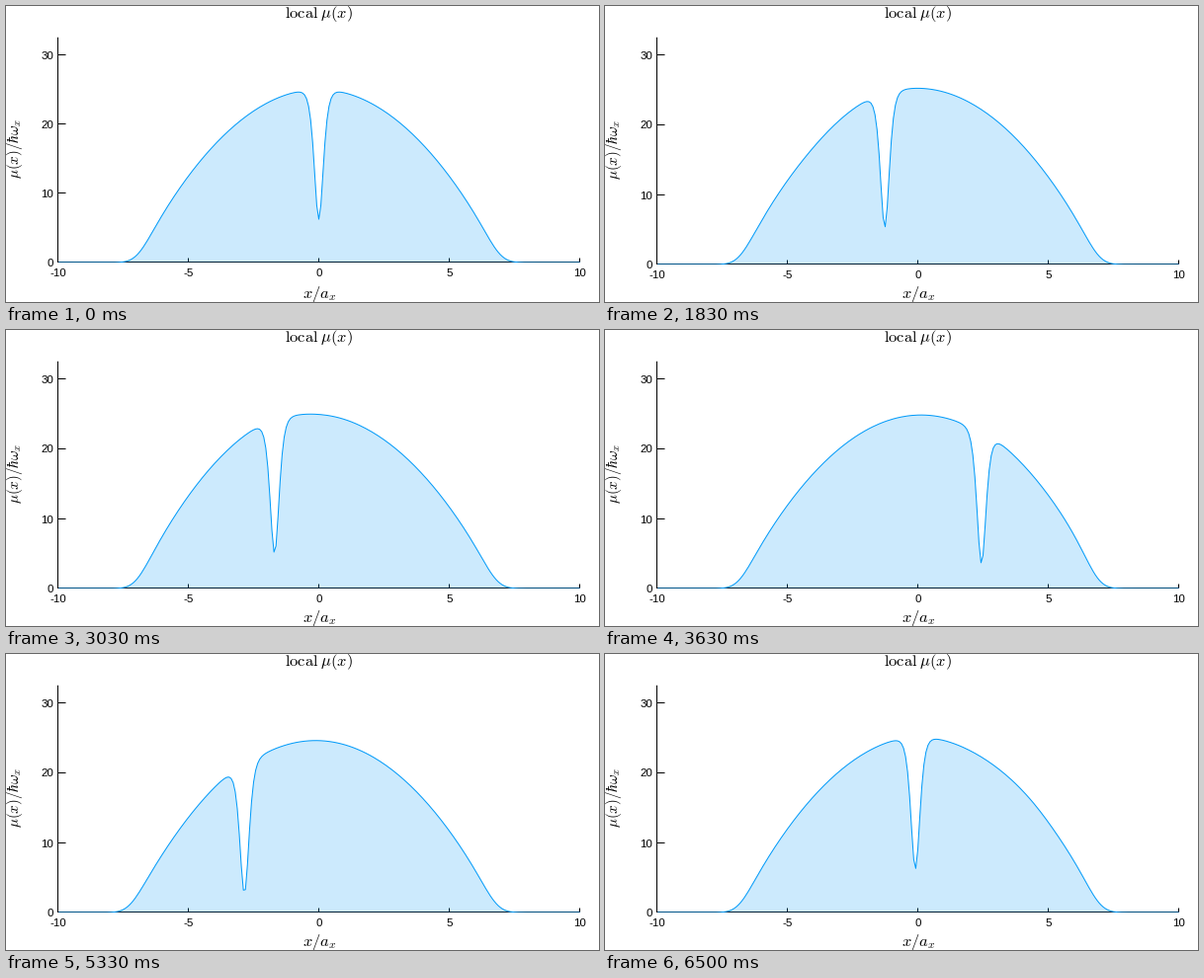
Animation of 600x300 px, one loop 6530 ms. Source, as a matplotlib script:

```python
import numpy as np
import matplotlib.pyplot as plt
from matplotlib.animation import FuncAnimation

# Dark soliton oscillating in a trapped 1D condensate (Gross-Pitaevskii equation)
W, H, DPI = 600, 300, 100
PX = 72 / DPI
TICKS, TICK_MS, FPS = 653, 10, 30
STATES = 196
BLUE = "#009af9"

MU, L, N = 25.0, 40.0, 512
YMAX = 1.3 * MU
x = -L / 2 + L / N * np.arange(N)
k = 2 * np.pi * np.fft.fftfreq(N, L / N)
trap = x**2 / 2
SUB = 28
STATE_DT = 8 * np.pi / np.sqrt(2) / 199


def evolve(psi, dt, steps):
    """Split-step evolution; imaginary dt relaxes to the ground state."""
    half = np.exp(-0.25j * k**2 * dt)
    full = half**2
    spec = half * np.fft.fft(psi)
    for step in range(steps):
        psi = np.fft.ifft(spec)
        psi = psi * np.exp(-1j * dt * (trap - MU + abs(psi) ** 2))
        spec = np.fft.fft(psi) * (full if step < steps - 1 else half)
    return np.fft.ifft(spec)


def simulate():
    dt = STATE_DT / SUB
    ground = evolve(np.sqrt(np.maximum(MU - trap, 0)) + 0j, -1j * dt, 2000)
    c, beta = np.sqrt(MU), 0.5
    f = np.sqrt(1 - beta**2)
    psi = ground * (f * np.tanh(f * c * x) + 1j * beta)
    out = [abs(psi) ** 2]
    for _ in range(STATES - 1):
        psi = evolve(psi, dt, SUB)
        out.append(abs(psi) ** 2)
    return out


density = simulate()

plt.rcParams.update({"mathtext.fontset": "cm", "font.family": "Liberation Sans"})
fig = plt.figure(figsize=(W / DPI, H / DPI), dpi=DPI, facecolor="white")

LEFT, RIGHT, TOP = 52.5, 580.5, 31.75


class View:
    """The plot in pixel coordinates, with its x axis at a given height."""

    def __init__(self, bottom):
        self.bottom = bottom
        self.ax = ax = fig.add_axes([0, 0, 1, 1])
        ax.set(xlim=(0, W), ylim=(H, 0))
        ax.axis("off")
        base = bottom - 0.5

        self.stroke([LEFT, LEFT], [TOP, bottom])
        self.stroke([LEFT - 0.5, RIGHT + 0.5], [base, base])
        for v in range(-10, 11, 5):
            px = self.to_x(v)
            self.stroke([px, px], [base, base - 4])
            self.text(px, bottom + 14, str(v), 11.5, "baseline")
        for v in range(0, 31, 10):
            py = np.floor(self.to_y(v)) + 0.5
            if v:
                self.stroke([LEFT, LEFT + 8], [py, py])
            self.text(48, py + 4, str(v), 11.5, "baseline", ha="right")

        self.text(316.5, 8.4, r"$\mathrm{local}\;\mu(x)$", 16.4)
        self.text(316.7, 292.3, r"$x/a_x$", 16.4)
        self.text(9, bottom / 2 + 14.5, r"$\mu(x)/\hbar\omega_x$", 15, rotation=90)

        self.px = self.to_x(x)
        zero = np.full(N, bottom)
        self.fill, = ax.fill(self.px, zero, color=BLUE, alpha=0.2, lw=0, zorder=2.6)
        self.line, = ax.plot(self.px, zero, color=BLUE, lw=PX, zorder=3)
        frame = plt.Rectangle((LEFT, TOP), RIGHT - LEFT, bottom - TOP,
                              transform=ax.transData)
        for artist in (self.fill, self.line):
            artist.set_clip_path(frame)

    def to_x(self, v):
        return LEFT + (v + 10) / 20 * (RIGHT - LEFT)

    def to_y(self, v):
        return self.bottom - v / YMAX * (self.bottom - TOP)

    def stroke(self, xs, ys):
        self.ax.plot(xs, ys, color="black", lw=PX, snap=False,
                     solid_capstyle="butt", zorder=2)

    def text(self, px, py, s, size, va="center", ha="center", **kw):
        self.ax.text(px, py, s, size=size * PX, ha=ha, va=va, **kw)

    def show(self, y):
        py = self.to_y(y)
        self.line.set_ydata(py)
        self.fill.set_xy(np.column_stack([self.px, py]))


# the opening picture has a slightly shorter plot area
opening, regular = View(260), View(262)


def update(tick):
    i = int((tick + 0.5) * TICK_MS * FPS / 1000)
    view = regular if i else opening
    view.show(density[i])
    for v in (opening, regular):
        v.ax.set_visible(v is view)
    return view.line, view.fill


anim = FuncAnimation(fig, update, frames=TICKS, interval=TICK_MS,
                     repeat=True, blit=False)
plt.show()
```
